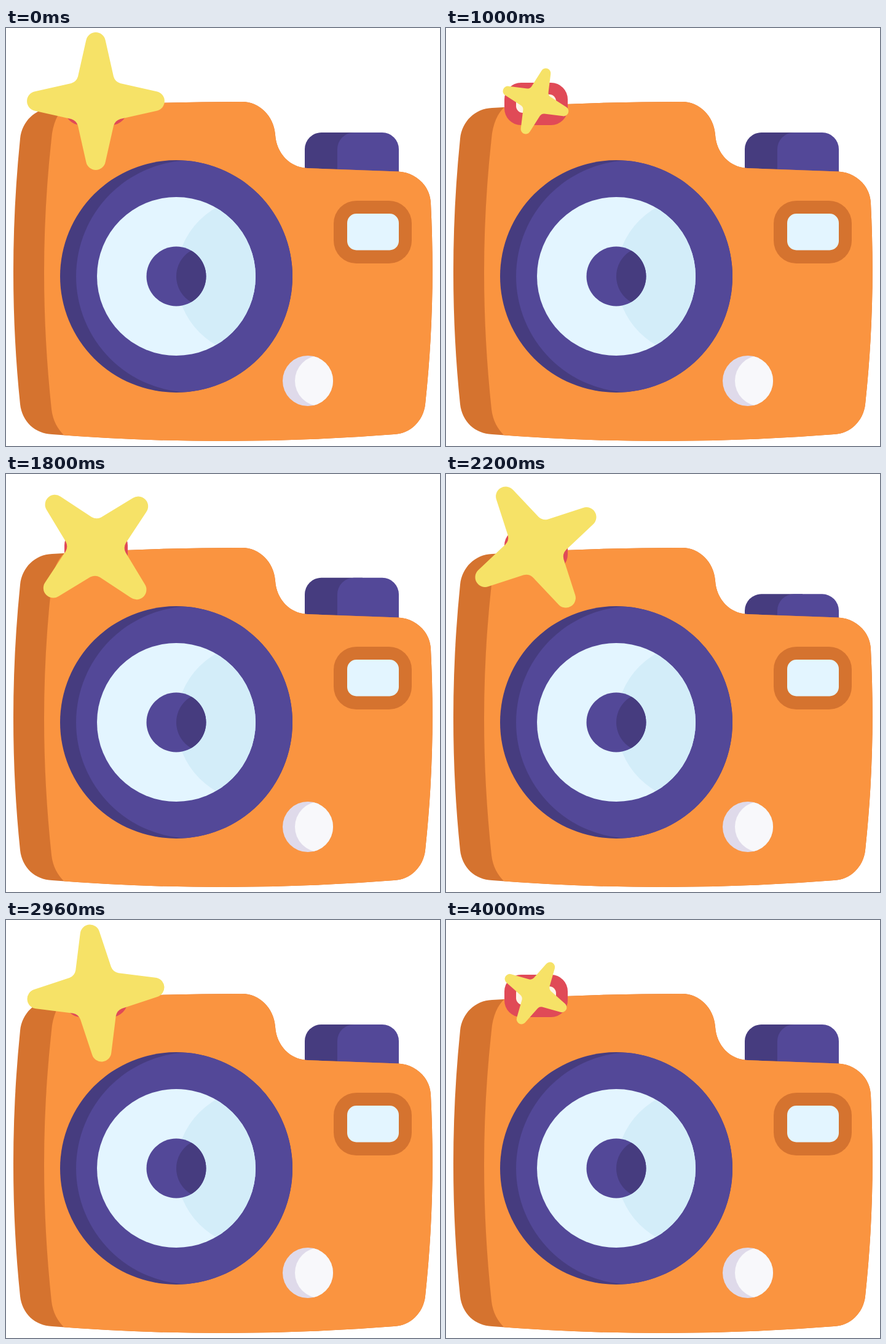
Recreate the animation shown at these times as an HTML page. Size 706 px wide and 680 px high, loop 4040 ms.

```html
<!DOCTYPE html>
<html lang="en">
<head>
<meta charset="utf-8">
<title>Camera</title>
<style>
  html, body { margin: 0; width: 100%; height: 100%; overflow: hidden; background: #fff; }
  svg { display: block; width: 100%; height: 100%; }
  .orange { fill: #fa9440; }
  .rust { fill: #d5732f; }
  .violet { fill: #534898; }
  .plum { fill: #463c7f; }
  .ice { fill: #e3f5ff; }
  .sky { fill: #d3edf9; }
</style>
</head>
<body>
<svg viewBox="0 0 706 680">
  <defs>
    <path id="shell" d="M75 130 Q230 120 384 120 C412 120 436 143 438 174 C440 204 462 227 490 228
      L638 233.500 C667 235 690 257 691 285 C696 385 695 490 682 612 C679 639 658 660 631 661
      Q353 683 75 661 C47 660 26 640 23 612 C8.300 470 8.300 325 23 180 C26 152 47 131 75 130Z"/>
    <clipPath id="inShell"><use href="#shell"/></clipPath>
    <clipPath id="inLens"><circle cx="277" cy="404" r="189"/></clipPath>
    <clipPath id="inGlass"><circle cx="277" cy="404" r="129"/></clipPath>
    <clipPath id="inPupil"><circle cx="277" cy="404" r="48.500"/></clipPath>
    <clipPath id="inKnob"><circle cx="491" cy="574" r="41"/></clipPath>
  </defs>

  <g id="button">
    <path class="plum" d="M486 250 V197 A27 27 0 0 1 513 170 H580 V250Z"/>
    <path class="violet" d="M539 250 V197 A27 27 0 0 1 566 170 H612 A27 27 0 0 1 639 197 V250Z"/>
  </g>

  <use href="#shell" class="rust"/>
  <path class="orange" clip-path="url(#inShell)"
    d="M96 128 C84 138 76 156 74 180 C58 325 58 470 74 620 C76 638 84 653 96 664 V680 H706 V100 H96Z"/>

  <circle class="plum" cx="277" cy="404" r="189"/>
  <circle class="violet" cx="303" cy="404" r="189" clip-path="url(#inLens)"/>
  <circle class="ice" cx="277" cy="404" r="129"/>
  <circle class="sky" cx="406" cy="404" r="129" clip-path="url(#inGlass)"/>
  <circle class="violet" cx="277" cy="404" r="48.500"/>
  <circle class="plum" cx="325.500" cy="404" r="48.500" clip-path="url(#inPupil)"/>

  <circle fill="#dfdaea" cx="491" cy="574" r="41"/>
  <circle fill="#f8f8fb" cx="511" cy="574" r="41" clip-path="url(#inKnob)"/>

  <rect class="rust" x="533" y="281" width="127" height="102" rx="37"/>
  <rect class="ice" x="555" y="302" width="84" height="59.500" rx="15"/>

  <rect fill="#e04a57" x="95" y="89" width="103" height="69" rx="27"/>
  <rect fill="#fef5e6" x="114" y="108" width="65" height="30" rx="11"/>
  <path id="star" fill="#f6e267"/>
</svg>

<script>
const LOOP = 4040;
const SPIN_START = 400;
const button = document.getElementById('button');
const star = document.getElementById('star');

// Four identical rounded points, each a quarter turn from the last.
function starPath() {
  const quarter = [[29, -40], [31.5, -31.5], [40, -29], [99, -15.7], [99, 15.7]];
  let d = '';
  for (let i = 0; i < 4; i++) {
    const [a, b, c, e, f] = quarter.map(([x, y]) => {
      for (let n = 0; n < i; n++) [x, y] = [-y, x];
      return x + ' ' + y;
    });
    d += `${i ? 'L' : 'M'}${a} Q${b} ${c} L${e} A16 16 0 0 1 ${f} `;
  }
  return d + 'Z';
}

// Smooth interpolation through [time, value] steps.
function track(steps, t) {
  const i = steps.findIndex(s => s[0] > t);
  if (i < 0) return steps[steps.length - 1][1];
  if (i === 0) return steps[0][1];
  const [t0, v0] = steps[i - 1], [t1, v1] = steps[i];
  const p = (t - t0) / (t1 - t0);
  return v0 + (v1 - v0) * p * p * (3 - 2 * p);
}

const press = [[0, 0], [380, 47], [600, -0.4], [800, -1.2], [1000, 0]];
const pulse = [[0, 1], [400, 1], [540, 0.503], [1000, 0.503], [1140, 1], [3400, 1], [3540, 0.503]];

function draw(t) {
  const angle = Math.max(0, t - SPIN_START) * 120 / (LOOP - SPIN_START);
  button.setAttribute('transform', `translate(0 ${track(press, t % 1000)})`);
  star.setAttribute('transform',
    `translate(146 119) rotate(${angle}) scale(${track(pulse, t)})`);
}

star.setAttribute('d', starPath());
draw(0);
const start = performance.now();
function tick() {
  const t = (performance.now() - start) % LOOP;
  draw(Math.floor(t / 40) * 40);
  requestAnimationFrame(tick);
}
requestAnimationFrame(tick);
</script>
</body>
</html>
```
